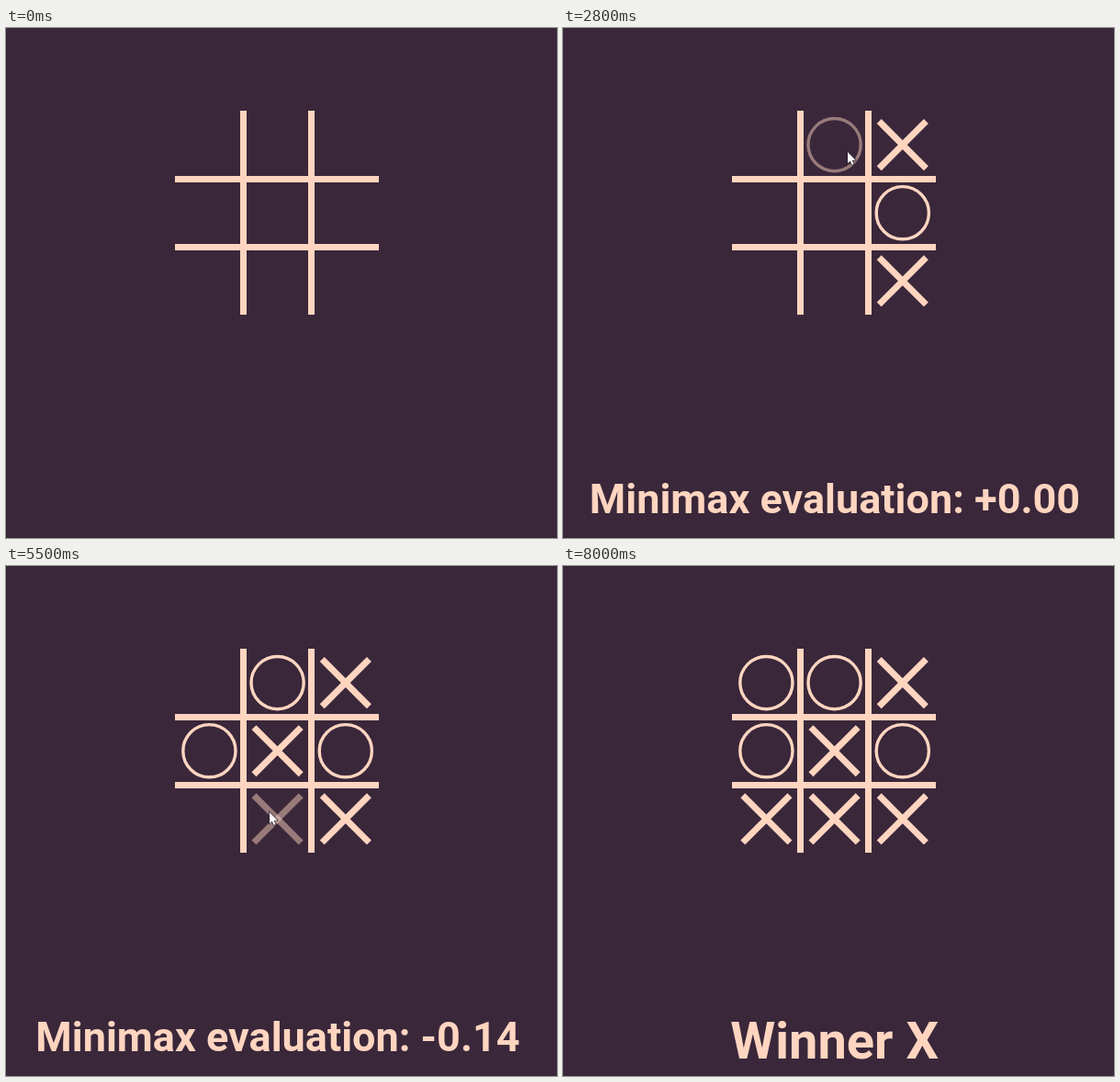
An HTML page with a canvas that plays this animation: 600x555 px, repeating every 8700 ms.

```html
<!DOCTYPE html>
<html lang="en">
<head>
<meta charset="utf-8">
<title>Tic-tac-toe minimax</title>
<style>
  html, body { margin: 0; width: 100%; height: 100%; overflow: hidden; background: #3a273a; }
  canvas { display: block; }
</style>
</head>
<body>
<canvas id="stage" width="600" height="555"></canvas>
<script>
const ctx = document.getElementById('stage').getContext('2d');
const LOOP = 8700, STEP = 100;
const TRAVEL = 300;  // pointer time from cell to cell
const THINK = 200;   // wait between a click and its evaluation
const DEPTH = 4;     // search limit in plies
const INK = '#ffd5c0', BG = '#3a273a';
const PURPLE = '#4d2849', SLATE = '#333848', TEAL = '#274e57';

// Where the pointer rests, when it gets there and when it clicks
const stops = [
  { x: 586, y: 300, arrive: 300, click: 300 },
  { x: 352, y: 284, arrive: 600, click: 700 },
  { x: 352, y: 209, arrive: 1200, click: 1800 },
  { x: 356, y: 142, arrive: 2200, click: 2600 },
  { x: 310, y: 135, arrive: 2800, click: 3200 },
  { x: 308, y: 180, arrive: 3500, click: 4100 },
  { x: 238, y: 220, arrive: 4300, click: 4600 },
  { x: 287, y: 268, arrive: 5100, click: 5900 },
  { x: 233, y: 150, arrive: 6100, click: 6100 },
  { x: 231, y: 247, arrive: 6500, click: 6600 },
  { x: 592, y: 318, arrive: 7300, click: 7300 }
];

// Cells that light up after a given number of moves
const glows = {
  2: { 4: SLATE },
  4: { 3: PURPLE, 4: SLATE, 5: TEAL, 6: SLATE, 7: PURPLE },
  6: { 1: PURPLE, 3: PURPLE, 7: SLATE }
};

const clamp = v => Math.max(0, Math.min(1, v));
const center = cell => [221.4 + 74.2 * (cell % 3), 127.1 + 74.1 * Math.floor(cell / 3)];

function cellAt({ x, y }) {
  const col = Math.floor((x - 184) / 74.2), row = Math.floor((y - 90) / 74.1);
  return col >= 0 && col < 3 && row >= 0 && row < 3 ? row * 3 + col : -1;
}

// --- game ---

// A player wins with a row, a column or a diagonal
function wins(board, who) {
  const has = (first, step) => [0, 1, 2].every(i => board[first + i * step] === who);
  return [0, 1, 2].some(i => has(i * 3, 1) || has(i, 3)) || has(0, 4) || has(2, 2);
}

// Value for the player to move; a win counts less the later it comes
function search(board, ply, depth) {
  const who = ply % 2;
  if (wins(board, 1 - who)) return -1 / ply;
  if (ply === 9 || !depth) return 0;
  let best = -1;
  for (let cell = 0; cell < 9; cell++) {
    if (board[cell] !== undefined) continue;
    const next = [...board];
    next[cell] = who;
    best = Math.max(best, -search(next, ply + 1, depth - 1));
  }
  return best;
}

const board = Array(9).fill(undefined);
const moves = stops.slice(1, -1).map(({ x, y, click }, turn) => {
  const cell = cellAt({ x, y });
  board[cell] = turn % 2;
  const value = -search(board, turn + 1, DEPTH);
  const text = (value < 0 ? '' : '+') + value.toFixed(2);
  return { cell, click, text, won: wins(board, turn % 2) };
});

// --- drawing ---

function pointer(t) {
  const i = stops.findIndex((s, n) => n && t <= s.arrive);
  if (t < stops[0].arrive || i < 0) return null;
  const a = stops[i - 1], b = stops[i];
  const leave = Math.max(a.click, b.arrive - TRAVEL);
  const k = clamp((t - leave) / (b.arrive - leave));
  return { x: a.x + (b.x - a.x) * k, y: a.y + (b.y - a.y) * k };
}

function line(x0, y0, x1, y1) {
  ctx.beginPath();
  ctx.moveTo(x0, y0);
  ctx.lineTo(x1, y1);
  ctx.stroke();
}

function mark(cell, turn, alpha) {
  const [x, y] = center(cell), r = 25.6;
  ctx.globalAlpha = alpha;
  ctx.strokeStyle = INK;
  if (turn % 2) {
    ctx.lineWidth = 3.4;
    ctx.beginPath();
    ctx.arc(x, y, 28.6, 0, Math.PI * 2);
    ctx.stroke();
  } else {
    ctx.lineWidth = 7;
    line(x - r, y - r, x + r, y + r);
    line(x + r, y - r, x - r, y + r);
  }
  ctx.globalAlpha = 1;
}

function grid() {
  ctx.fillStyle = INK;
  for (const d of [0, 74]) {
    ctx.fillRect(255 + d, 90, 7, 222);
    ctx.fillRect(184, 161 + d, 222, 7);
  }
}

// Lights fade in after a click and are gone 800 ms later
function glow(cells, age) {
  ctx.globalAlpha = clamp(Math.min(age / 250, (800 - age) / 200));
  for (const cell in cells) {
    const [x, y] = center(cell);
    ctx.fillStyle = cells[cell];
    ctx.fillRect(Math.round(x - 33.5), Math.round(y - 33.5), 67, 67);
  }
  ctx.globalAlpha = 1;
}

function label(text, size, x, y) {
  ctx.font = `bold ${size}px Roboto, sans-serif`;
  ctx.textAlign = 'center';
  ctx.fillStyle = INK;
  ctx.fillText(text, x, y);
}

function arrow({ x, y }) {
  ctx.save();
  ctx.translate(x, y);
  ctx.scale(0.9, 0.9);
  ctx.lineWidth = 1.4;
  ctx.strokeStyle = '#1c141d';
  ctx.fillStyle = '#fff';
  const shape = new Path2D('M0 0V13.5L3.1 10.7L5.2 15.5L7.4 14.5L5.4 9.9L9.6 9.6Z');
  ctx.stroke(shape);
  ctx.fill(shape);
  ctx.restore();
}

function draw(t) {
  const played = moves.filter(m => m.click <= t);
  const last = played[played.length - 1];
  const tip = pointer(t);

  ctx.fillStyle = BG;
  ctx.fillRect(0, 0, 600, 555);
  if (last) glow(glows[played.length], t - last.click);
  grid();
  played.forEach((m, turn) => mark(m.cell, turn, 1));

  if (last && last.won) {
    label('Winner X', 56, 295.6, 535.5);
  } else {
    const cell = tip ? cellAt(tip) : -1;
    if (cell >= 0 && !played.some(m => m.cell === cell)) mark(cell, played.length, 0.48);
    if (last && t >= last.click + THINK) label('Minimax evaluation: ' + last.text, 45, 296, 528);
  }

  if (tip) arrow(tip);
}

const start = performance.now();
function tick() {
  const t = (performance.now() - start) % LOOP;
  draw(Math.floor(t / STEP) * STEP);
  requestAnimationFrame(tick);
}
tick();
</script>
</body>
</html>
```
